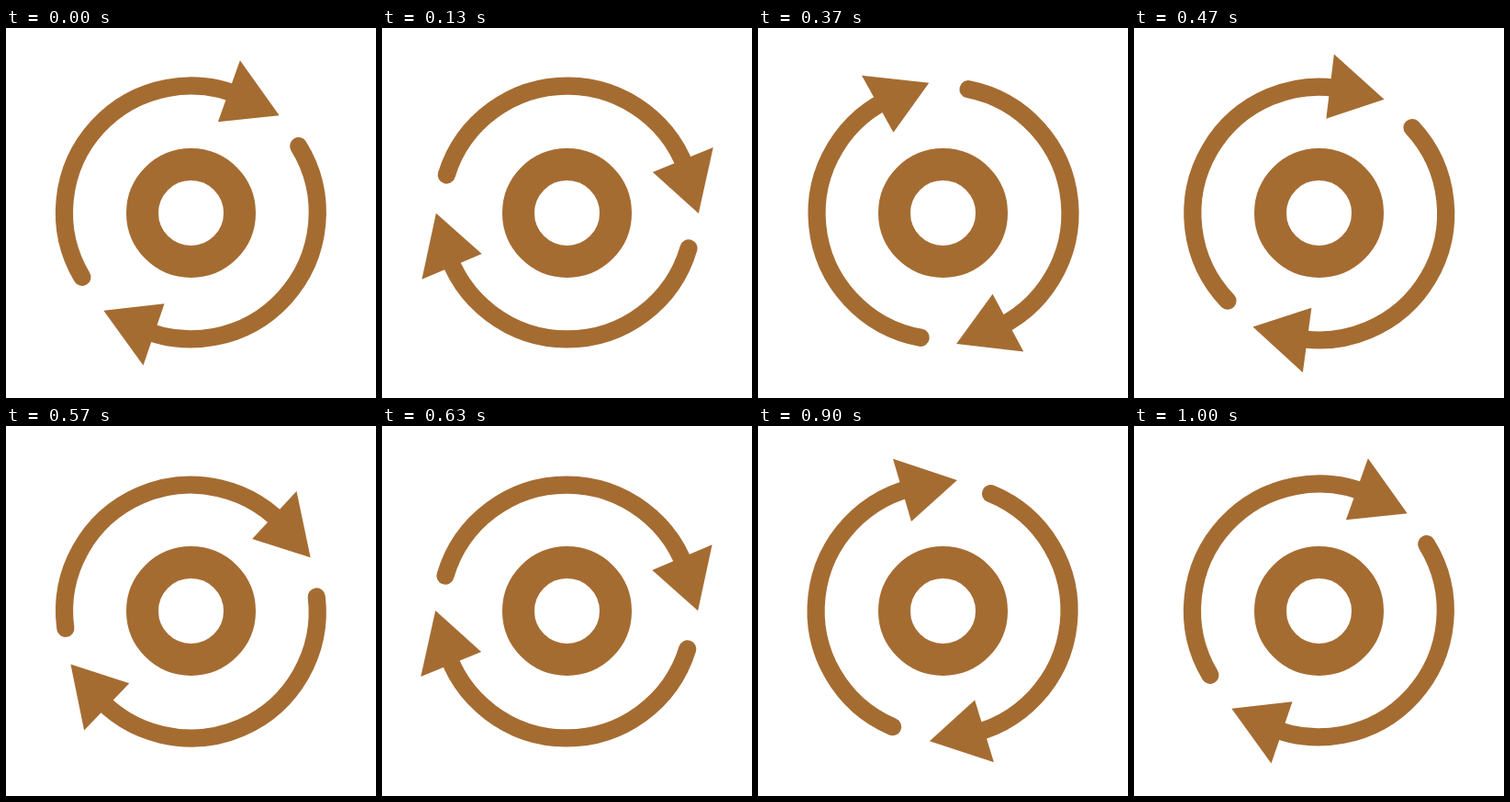
These frames come from a looping animation (403 px wide and 403 px high, 1030 ms). An HTML page:

```html
<!DOCTYPE html>
<html lang="en">
<head>
<meta charset="utf-8">
<title>Rotating arrows</title>
<style>
  html, body { margin: 0; width: 100%; height: 100%; overflow: hidden; background: #fff; }
  svg { display: block; width: 100vw; height: 100vh; }
</style>
</head>
<body>
<svg viewBox="-201.5 -201.5 403 403">
  <circle r="53" fill="none" stroke="#a56c32" stroke-width="35"/>
  <g id="arrows" fill="#a56c32">
    <g fill="none" stroke="#a56c32" stroke-width="19.2" stroke-linecap="round">
      <path d="M-118.6 69.8A137.7 137.7 0 0 1 60 -124.5"/>
      <path d="M117.2 -72.8A137.7 137.7 0 0 1 -60.8 123.1"/>
    </g>
    <path d="M53.4 -166.2L96.2 -106.2L29.4 -99.2Z"/>
    <path d="M-52 165.9L-95.2 106.2L-29 98.8Z"/>
  </g>
</svg>
<script>
  const LOOP = 1030, STEP_ANGLE = 12;
  const arrows = document.getElementById('arrows');

  // Three steps per 100 ms, lasting 30, 40 and 30 ms.
  function stepAt(ms) {
    const rest = ms % 100;
    return 3 * Math.floor(ms / 100) + (rest >= 30) + (rest >= 70);
  }

  function draw(now) {
    const angle = STEP_ANGLE * stepAt(now % LOOP);
    arrows.setAttribute('transform', `rotate(${angle})`);
  }

  let start;
  function tick(now) {
    start ??= now;
    draw(now - start);
    requestAnimationFrame(tick);
  }
  draw(0);
  requestAnimationFrame(tick);
</script>
</body>
</html>
```
